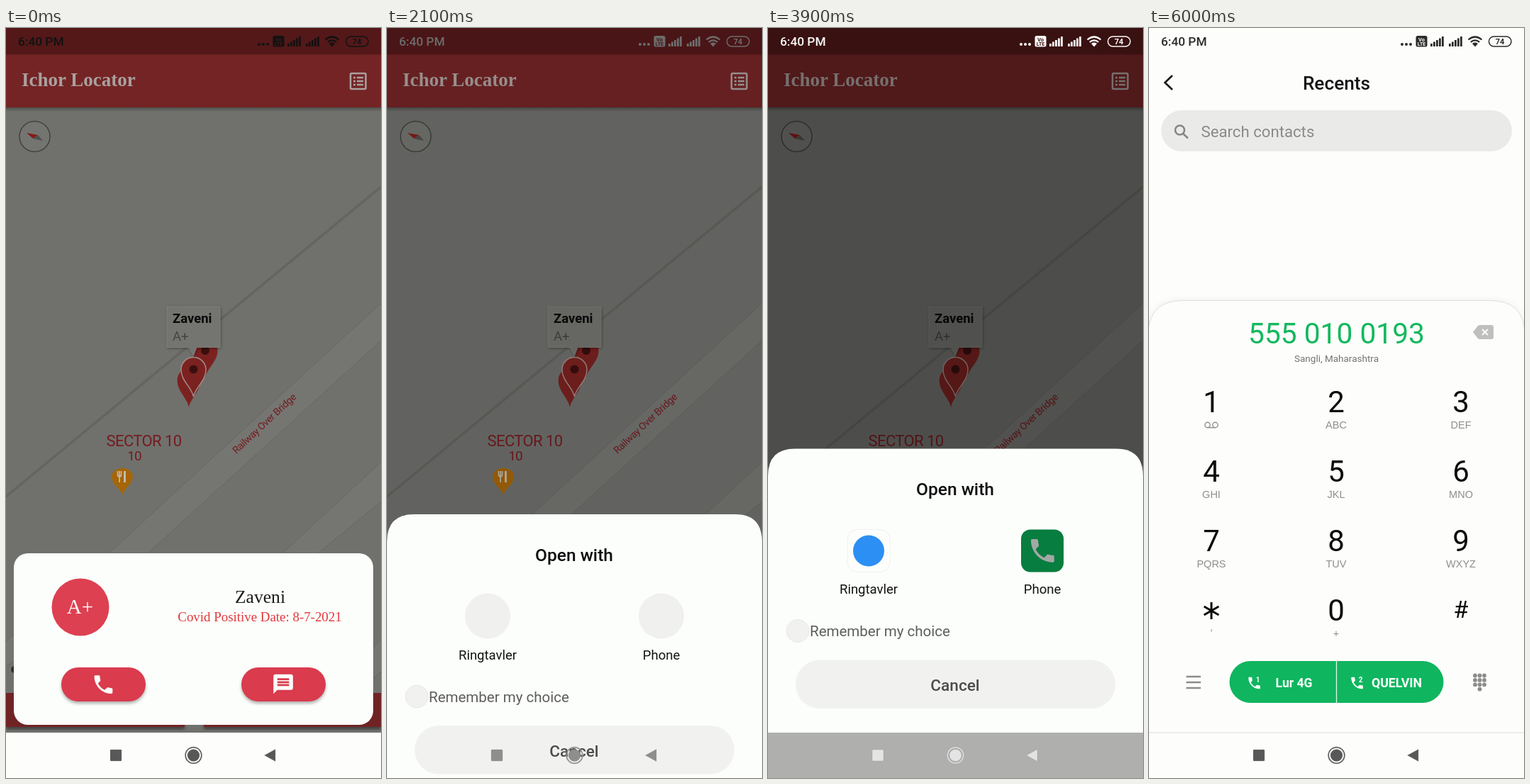
An HTML page for the animation above (6.1 s loop, 529x1058 px).

```html
<!DOCTYPE html>
<html lang="en">
<head>
<meta charset="utf-8">
<title>Donor call</title>
<style>
  html, body { margin: 0; width: 100%; height: 100%; overflow: hidden; background: #fdfefb; }
  svg { display: block; width: 100%; height: 100%; }
  text { font-family: Roboto, sans-serif; }
  .serif { font-family: "Liberation Serif", serif; }
  .sub { font-family: "Liberation Sans", sans-serif; font-size: 14.5px; fill: #8e8f8d; }
  .mid { text-anchor: middle; }
  .med { font-weight: 500; }
  .bold { font-weight: 700; }
  .line { fill: none; stroke: currentColor; }
</style>
</head>
<body>
<svg viewBox="0 0 529 1058">
  <defs>
    <path id="call" d="M6.62 10.79c1.44 2.83 3.76 5.14 6.59 6.59l2.2-2.2c.27-.27.67-.36 1.02-.24 1.12.37 2.33.57 3.57.57.55 0 1 .45 1 1V20c0 .55-.45 1-1 1-9.39 0-17-7.61-17-17 0-.55.45-1 1-1h3.5c.55 0 1 .45 1 1 0 1.25.2 2.45.57 3.57.11.35.03.74-.25 1.02z"/>
    <path id="pin" d="M0 0C-3-14-17.500-22-17.500-38a17.500 17.500 0 0 1 35 0C17.500-22 3-14 0 0z"/>
    <linearGradient id="fade" x2="0" y2="1">
      <stop offset="0" stop-opacity=".3"/><stop offset="1" stop-opacity="0"/>
    </linearGradient>
    <filter id="soft" x="-20%" y="-20%" width="140%" height="150%"><feGaussianBlur stdDeviation="2"/></filter>
    <filter id="glow" x="-10%" y="-10%" width="120%" height="120%"><feGaussianBlur stdDeviation="6"/></filter>
  </defs>

  <g id="finder">
    <rect width="529" height="995" fill="#70716d"/>
    <!-- map -->
    <path d="M0 661L529 224" stroke="#646561" stroke-width="3.500"/>
    <g fill="#757672" stroke="#666763">
      <path d="M540 378L145 741H200L540 431z"/>
      <path d="M540 602L390 741H440L540 659z"/>
      <path d="M-5 870L40 828V870L-5 905zM500 893L540 850V900L500 930z"/>
    </g>
    <g fill="#751c20">
      <text class="mid" x="194.500" y="590" font-size="22" letter-spacing="-.6">SECTOR 10</text>
      <text class="mid" x="181" y="610" font-size="19" letter-spacing="-1">10</text>
      <text class="mid" font-size="14" letter-spacing="-.35" transform="translate(367.500 561.500) rotate(-43)">Railway Over Bridge</text>
    </g>
    <use href="#pin" fill="#a66508" transform="translate(164 659) scale(.85 .69)"/>
    <g fill="none" stroke="#c3c0b9">
      <path d="M157.500 625v5q0 3 2.500 3t2.500-3v-5M160 625v16" stroke-width="1.600"/>
      <path d="M167.500 625v16" stroke-width="2.800"/>
    </g>
    <g fill="#7b2220">
      <use href="#pin" x="281" y="493"/>
      <use href="#pin" x="258" y="535" transform="translate(18 0) scale(.93 1)"/>
      <use href="#pin" x="264.500" y="520" stroke="#a28d8a" stroke-width="1.500"/>
    </g>
    <g fill="#3b0f0f"><circle cx="281" cy="455" r="6"/><circle cx="264.500" cy="481.500" r="6"/></g>
    <path d="M228 394H303V452H271L265 463 259 452H228z" opacity=".35" filter="url(#soft)"/>
    <path d="M227 393H302V450.500H269L264.500 462 258 450.500H227z" fill="#747571" stroke="#858682" stroke-width=".8"/>
    <text class="bold" x="235" y="416" font-size="18.500" fill="#090909">Zaveni</text>
    <text x="235" y="441" font-size="18.500" fill="#444542">A+</text>
    <circle cx="40.500" cy="153" r="21.500" fill="#747571" stroke="#414240" stroke-width="1.500"/>
    <path d="M29 148L45 151 38 156z" fill="#851a1b"/>
    <path d="M45 151L52 159 38 156z" fill="#4f504d"/>
    <!-- app bar -->
    <rect y="112" width="529" height="6" fill="url(#fade)"/>
    <rect width="529" height="112" fill="#742425"/>
    <rect width="529" height="37.500" fill="#541819"/>
    <text class="serif bold" x="22" y="82" font-size="27" fill="#aaa19f">Ichor Locator</text>
    <g fill="none" stroke="#aaa19f" stroke-width="2.500">
      <rect x="486" y="64" width="21.500" height="22" rx="1.500"/>
      <path d="M490 70h3m2 0h9M490 75h3m2 0h9M490 80h3m2 0h9"/>
    </g>
    <!-- bottom buttons -->
    <circle cx="12" cy="905" r="5" fill="#30312f"/>
    <path d="M0 984H252V989H0zM279 984H529V989H279z" opacity=".5" filter="url(#soft)"/>
    <path d="M0 938H252V986H0zM279 938H529V986H279z" fill="#702324"/>
    <!-- donor card -->
    <rect x="11" y="741" width="507" height="242" rx="20" fill="#fcfefb"/>
    <circle cx="105" cy="817" r="40.500" fill="#dd4051"/>
    <text class="serif mid" x="104.500" y="826" font-size="29" fill="#fcfdfa">A+</text>
    <text class="serif mid" x="358.500" y="811" font-size="25.600" fill="#1d1e1c">Zaveni</text>
    <text class="serif mid" x="358" y="837" font-size="18.900" fill="#e1393c">Covid Positive Date: 8-7-2021</text>
    <g id="actions"></g>
    <use href="#call" fill="#fcfdfa" transform="translate(120.300 909) scale(1.430)"/>
    <path transform="translate(374.500 909) scale(1.380)" fill="#fcfdfa" d="M20 2H4c-1.1 0-2 .9-2 2v18l4-4h14c1.1 0 2-.9 2-2V4c0-1.1-.9-2-2-2zm-2 12H6v-2h12zm0-3H6V9h12zm0-3H6V6h12z"/>
    <rect y="994" width="529" height="64" fill="#fdfefb"/>
    <rect id="dim" width="529" height="1058"/>

    <g id="sheet">
      <path d="M0 994V632Q0 593.500 38 593.500H491Q529 593.500 529 632V994z" fill="#fcfefb"/>
      <text class="mid med" x="264" y="659" font-size="24.500" fill="#0d0d0d">Open with</text>
      <g id="blank" fill="#f0f1ef"><circle cx="142" cy="737" r="32"/><circle cx="387" cy="737" r="32"/></g>
      <g id="appA">
        <rect x="112" y="707.500" width="60" height="60" rx="14" fill="#fdfefc" stroke="#f0f1ef"/>
        <circle cx="142" cy="737.500" r="22" fill="#2c8ff3"/>
      </g>
      <g id="appB">
        <rect x="357" y="707.500" width="60" height="60" rx="13" fill="#087d40"/>
        <use href="#call" fill="#a2a8a3" transform="translate(365.500 715.500) scale(1.820)"/>
      </g>
      <g class="mid" font-size="18.500" fill="#121312">
        <text x="142" y="798">Ringtavler</text><text x="387" y="798">Phone</text>
      </g>
      <circle cx="42" cy="850.500" r="16" fill="#f1f2f0" stroke="#e8e9e7"/>
      <text x="59" y="858" font-size="20.500" fill="#5e5f5d">Remember my choice</text>
      <rect x="39" y="891.500" width="451" height="68.500" rx="34" fill="#f1f2f0"/>
      <text class="mid med" x="264" y="935" font-size="22.600" fill="#4b4c4a">Cancel</text>
    </g>
  </g>

  <g id="dialer">
    <rect width="529" height="1058" fill="#fdfefb"/>
    <g id="pad">
      <path d="M33 67L22.500 77 33 87" fill="none" stroke="#161716" stroke-width="2.600"/>
      <text class="mid med" x="264.500" y="87" font-size="26.200" fill="#131413">Recents</text>
      <rect x="17" y="116" width="495" height="58" rx="29" fill="#eaebe9"/>
      <path d="M48 149l7 6.500M50 144a6.500 6.500 0 1 0-13 0a6.500 6.500 0 1 0 13 0" fill="none" stroke="#868785" stroke-width="2.600"/>
      <text x="73.500" y="154" font-size="22.200" fill="#8a8b89">Search contacts</text>
      <path d="M0 440V433Q0 385 48 385H481Q529 385 529 433V440" opacity=".07" filter="url(#glow)"/>
      <path d="M-1 994V433Q-1 384.500 48 384.500H481Q530 384.500 530 433V994z" fill="#fdfefb" stroke="#dfe0de"/>
      <text class="mid" x="264.500" y="445" font-size="40.700" fill="#14b85e">555 010 0193</text>
      <text class="mid" x="264.500" y="471" font-size="13.500" fill="#737472">Sangli, Maharashtra</text>
      <path d="M457 429l7-9q1-1 3-1h16q3 0 3 3v14q0 3-3 3h-16q-2 0-3-1z" fill="#bfc0be"/>
      <path d="M470 425l8 8m0-8l-8 8" stroke="#fdfefb" stroke-width="2"/>
      <g id="keys"></g>
      <path d="M88 810v24M77.600 816l20.800 12m0-12l-20.800 12" stroke="#0b0b0b" stroke-width="3"/>
      <g fill="none" stroke="#8e8f8d" stroke-width="1.400">
        <circle cx="82.500" cy="560" r="3.700"/><circle cx="93.500" cy="560" r="3.700"/><path d="M82.500 563.700h11"/>
      </g>
      <path d="M52.500 915H73M52.500 923H73M52.500 931H73" stroke="#8c8d8b" stroke-width="2.600"/>
      <g id="dots" fill="#8c8d8b"></g>
      <rect x="113.500" y="893" width="302" height="59" rx="29.500" fill="#10b55f"/>
      <path d="M264.500 893v59" stroke="#dff5e9" stroke-width="1.300"/>
      <g fill="#fcfefb">
        <use href="#call" transform="translate(137.500 913) scale(.92)"/>
        <use href="#call" transform="translate(282.500 913) scale(.92)"/>
        <g class="bold mid">
          <text x="153.500" y="923" font-size="10">1</text>
          <text x="298.500" y="923" font-size="10">2</text>
          <text x="204.500" y="930" font-size="17.500">Lur 4G</text>
          <text x="349.500" y="930" font-size="17.800">QUELVIN</text>
        </g>
      </g>
    </g>
    <path id="rule" d="M0 994.500H529" stroke="#e9eae8"/>
  </g>

  <g id="status" fill="currentColor">
    <text class="med" x="17" y="25" font-size="17.300">6:40 PM</text>
    <circle cx="357" cy="23" r="2"/><circle cx="363" cy="23" r="2"/><circle cx="369" cy="23" r="2"/>
    <rect x="376.500" y="11" width="16" height="15.500" rx="2.500"/>
    <g id="volte" class="mid bold"><text x="384.500" y="18.500" font-size="7.500">Vo</text><text x="384.500" y="25.300" font-size="7">LTE</text></g>
    <g id="bars"></g>
    <path class="line" stroke-width="2.200" d="M450.500 16.500q9.500-8 19 0M453.800 19.800q6.200-5 12.400 0"/>
    <path d="M456 22q4-2.800 8 0l-4 4.500z"/>
    <rect class="line" x="479.500" y="12" width="31.500" height="14" rx="7" stroke-width="1.500"/>
    <text class="mid bold" x="495" y="23" font-size="11">74</text>
  </g>

  <g id="nav" fill="currentColor" stroke="#8b8c8a" stroke-opacity=".3">
    <rect x="147" y="1018" width="16" height="16" rx="1"/>
    <circle cx="264.500" cy="1026" r="11.300" fill="none" stroke="currentColor" stroke-opacity="1" stroke-width="1.500"/>
    <circle cx="264.500" cy="1026" r="12.200" fill="none"/>
    <circle cx="264.500" cy="1026" r="8.600"/>
    <path d="M364.500 1026L380 1017.500V1034.500z"/>
  </g>
</svg>
<script>
  const $ = id => document.getElementById(id);
  const clamp = x => Math.min(1, Math.max(0, x));
  const ramp = (t, from, length) => clamp((t - from) / length);
  const mix = (a, b, k) => a + (b - a) * k;
  const grey = v => `rgb(${v},${v},${v})`;
  const fill = (id, list, draw) => { $(id).innerHTML = list.map(draw).join(''); };

  fill('actions', [78, 332], x =>
    `<rect x="${x}" y="905" width="119" height="48" rx="24" opacity=".3" filter="url(#soft)"/>
     <rect x="${x}" y="902" width="119" height="48" rx="24" fill="#da3b4d"/>`);

  const labels = ['1', '2 ABC', '3 DEF', '4 GHI', '5 JKL', '6 MNO', '7 PQRS', '8 TUV', '9 WXYZ', ' ,', '0 +', '#'];
  fill('keys', labels, (label, i) => {
    const [digit, sub = ''] = label.split(' ');
    const x = 88 + i % 3 * 176, row = Math.floor(i / 3) * 98;
    const hash = digit === '#';
    return `<text class="mid" x="${x}" y="${(hash ? 538 : 542) + row}" font-size="${hash ? 34 : 42}" fill="#0b0b0b">${digit}</text>
      <text class="mid sub" x="${x}" y="${565 + row - (sub === ',' ? 9 : 0)}">${sub}</text>`;
  });

  fill('dots', [...Array(10).keys()], i =>
    `<circle cx="${i < 9 ? 460 + i % 3 * 6.5 : 466.5}" cy="${913.5 + Math.floor(i / 3) * 6.4}" r="2.9"/>`);

  fill('bars', [397, 423], x => [0, 1, 2, 3, 4].map(i =>
    `<rect x="${x + i * 4}" y="${22 - i * 2.5}" width="2.8" height="${4 + i * 2.5}"/>`).join(''));

  const LOOP = 6100, STEP = 100;

  function render(t) {
    const dialing = t >= 4000;
    const open = ramp(t, 1984, 300);

    $('dim').setAttribute('opacity', 0.31 * open);
    $('sheet').setAttribute('transform', `translate(0 ${401 * (1 - open) ** 3})`);
    $('sheet').setAttribute('opacity', clamp(open * 12.4));
    $('blank').setAttribute('opacity', t < 2200 ? 1 : 0);
    $('appA').setAttribute('opacity', t < 2200 ? 0 : 1);
    $('appB').setAttribute('opacity', ramp(t, 2300, 200));

    $('finder').style.display = dialing ? 'none' : '';
    $('dialer').style.display = dialing ? '' : 'none';
    $('pad').setAttribute('opacity', ramp(t, 5110, 250));

    const settle = ramp(t, 4000, 200);
    $('rule').setAttribute('opacity', settle);
    $('status').setAttribute('opacity', dialing ? settle : 1);
    $('status').style.color = dialing ? '#2c2d2b' : grey(mix(18, 250, open));
    $('volte').setAttribute('fill', dialing ? '#fdfefb' : '#471516');
    $('nav').style.color = grey(dialing ? mix(253, 88, settle) : mix(88, 228, open));
  }

  function frame(now) {
    render(Math.floor(now % LOOP / STEP) * STEP);
    requestAnimationFrame(frame);
  }
  render(0);
  requestAnimationFrame(frame);
</script>
</body>
</html>
```
